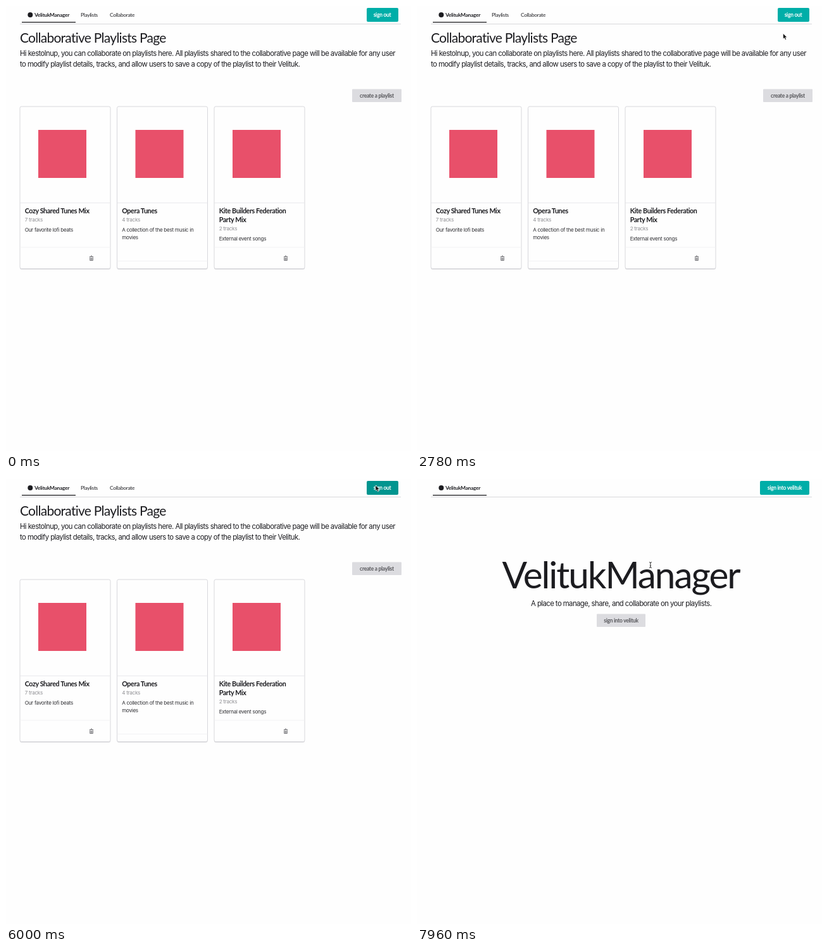
Write an HTML page that moves like this. It is 640 by 704 pixels and loops after 8000 ms.

```html
<!DOCTYPE html>
<html lang="en">
<head>
<meta charset="utf-8">
<title>Playlist manager</title>
<style>
  html, body { margin: 0; width: 100%; height: 100%; overflow: hidden; background: #fefefe; }
  svg { display: block; width: 100vw; height: 100vh; }
  text { fill: #1c1c20; white-space: pre; }
  .lato { font-family: Lato, sans-serif; letter-spacing: -.035em; }
  .bold { font-weight: 700; }
  .body { font: 11.3px Inter, sans-serif; letter-spacing: -.048em; }
  .small { font: 8.1px Inter, sans-serif; letter-spacing: -.034em; }
  .meta { fill: #8e8e92; }
  .label { font-size: 8.5px; font-weight: 700; }
  .label, .title { text-anchor: middle; }
  .white { fill: #fff; }
  .gray { fill: #58585c; }
  .desc { fill: #2e2e32; }
</style>
</head>
<body>
<svg id="stage" viewBox="0 0 640 704" preserveAspectRatio="none">
  <g id="nav"></g>
  <g id="playlists"></g>
  <g id="landing"></g>
  <g id="cursor">
    <path id="arrow" d="M0 0V8.6L2 6.9 3.4 10 5 9.3 3.6 6.2H6.3Z" fill="#111" stroke="#fff" stroke-width=".6"/>
    <path id="hand" d="M-1 0Q0-1.2 1 0V3L5 4Q6 4.4 5.6 6L4.8 9.6H.2L-2.6 5.8Q-2.8 4.2-1 5Z" fill="#fff" stroke="#222" stroke-width=".9"/>
    <path id="beam" d="M-2-4.5Q0-4.5 0-3Q0-4.5 2-4.5M0-3.5V3.5M-2 4.5Q0 4.5 0 3Q0 4.5 2 4.5M-1 1H1" fill="none" stroke="#222" stroke-width=".9"/>
  </g>
</svg>
<script>
const LOOP = 8000;
const PAGE_SWAP = 6480;
const FONTS_READY = 7000;
const TEAL = '#00aea8', TEAL_HOVER = '#00958f', TEAL_WAIT = '#00a49e';
const GRAY = '#dcdce0', INK = '#1c1c20', PAPER = '#fefefe';

const $ = id => document.getElementById(id);

function add(parent, tag, attrs, content) {
  const el = document.createElementNS('http://www.w3.org/2000/svg', tag);
  for (const key in attrs) el.setAttribute(key, attrs[key]);
  if (content) el.textContent = content;
  return parent.appendChild(el);
}
const group = parent => add(parent, 'g', {});
const text = (parent, x, y, str, cls, size) =>
  add(parent, 'text', { x, y, class: cls, ...(size && { style: `font-size:${size}px` }) }, str);
const box = (parent, x, y, width, height, fill, rx = 0) =>
  add(parent, 'rect', { x, y, width, height, fill, rx });

// navigation
const nav = $('nav');
box(nav, 22, 28, 602, 1, '#d8d8dc');
const underline = box(nav, 25, 25, 85, 1.3, INK);
const brand = group(nav);
add(brand, 'circle', { cx: 38.3, cy: 14, r: 4, fill: INK });
text(brand, 45, 17, 'VelitukManager', 'lato bold', 8.4);

// playlists page
const page = $('playlists');
text(page, 118, 17, 'Playlists', 'lato', 8.4);
text(page, 164, 17, 'Collaborate', 'lato', 8.4);
const signOut = box(page, 570, 3, 50, 22, TEAL, 2);
text(page, 594.5, 16.7, 'sign out', 'lato label white');
text(page, 22, 58, 'Collaborative Playlists Page', 'lato', 21);
text(page, 22, 79, 'Hi kestolnup, you can collaborate on playlists here. All playlists shared to the collaborative page will be available for any user', 'body');
text(page, 22, 96, 'to modify playlist details, tracks, and allow users to save a copy of the playlist to their Velituk.', 'body');
box(page, 547, 131.5, 78, 20.5, GRAY, 1);
text(page, 586, 144.7, 'create a playlist', 'lato label gray');

function trash(parent, x, y) {
  add(parent, 'path', {
    d: `M${x - 3} ${y - 2.5}H${x + 3}M${x - 1} ${y - 3.7}H${x + 1}M${x - 2.3} ${y - 1.7}V${y + 3.6}H${x + 2.3}V${y - 1.7}M${x - .8} ${y - 1}V${y + 3}M${x + .8} ${y - 1}V${y + 3}`,
    fill: 'none', stroke: '#66666a', 'stroke-width': .9
  });
}

function card(x, titles, tracks, lines, removable) {
  const g = group(page), left = x + 7.7;
  const shift = (titles.length - 1) * 13.5;
  box(g, x, 161, 143, 255.7, '#d4d4d8', 2.5);
  add(g, 'rect', { x, y: 159, width: 143, height: 256.5, rx: 2.5, fill: PAPER, stroke: '#d8d8dc', 'stroke-width': 1 });
  box(g, x + 29, 196, 76, 76, '#e8506a');
  box(g, x, 311, 143, .8, '#e4e4e8');
  titles.forEach((s, i) => text(g, left, 328 + i * 13.5, s, 'lato bold', 10.7));
  text(g, left, 341 + shift, tracks, 'small meta');
  lines.forEach((s, i) => text(g, left, 357.3 + shift + i * 12, s, 'small desc'));
  box(g, x, removable ? 381.5 : 403, 143, .8, '#f0f0f2');
  if (removable) trash(g, x + 113, 399);
}
card(22, ['Cozy Shared Tunes Mix'], '7 tracks', ['Our favorite lofi beats'], true);
card(175.5, ['Opera Tunes'], '4 tracks', ['A collection of the best music in', 'movies'], false);
card(329, ['Kite Builders Federation', 'Party Mix'], '2 tracks', ['External event songs'], true);

// landing page
const landing = $('landing');
const signIn = box(landing, 542, 3, 78, 22, TEAL, 2);
const signInCenter = box(landing, 284, 213.5, 77, 20.5, GRAY, 1);
text(landing, 180, 201, 'A place to manage, share, and collaborate on your playlists.', 'body');
const late = group(landing);
text(late, 581, 16.7, 'sign into velituk', 'lato label white');
text(late, 322.5, 226.7, 'sign into velituk', 'lato label gray');
text(late, 322, 173, 'VelitukManager', 'lato title', 58.5);

// pointer path: time, x, y
const path = [
  [0, 502, 716], [400, 508, 520], [820, 514, 342], [1140, 511.5, 268], [1560, 526, 200], [2400, 572, 66],
  [2780, 578.5, 43.5], [3240, 594, 13], [4060, 599, 8], [5760, 599, 8], [6000, 584, 10],
  [6480, 560, 14], [6820, 536.5, 18], [7540, 480, 38], [7960, 369, 136], [8000, 366, 138]
];

function pointerAt(t) {
  const i = path.findIndex(p => p[0] > t);
  const [t0, x0, y0] = path[i - 1], [t1, x1, y1] = path[i];
  const k = (t - t0) / (t1 - t0);
  return [x0 + (x1 - x0) * k, y0 + (y1 - y0) * k];
}

const show = (el, on) => { el.style.display = on ? '' : 'none'; };
const resize = (el, x, width) => { el.setAttribute('x', x); el.setAttribute('width', width); };

function render(t) {
  const [x, y] = pointerAt(t);
  const swapped = t >= PAGE_SWAP, ready = !swapped || t >= FONTS_READY;
  const hover = !swapped && x > 570 && y < 25;

  show(page, !swapped);
  show(landing, swapped);
  show(brand, ready);
  show(late, ready);
  underline.setAttribute('width', ready ? 85 : 87);
  resize(signIn, ready ? 542 : 538, ready ? 78 : 82);
  resize(signInCenter, ready ? 284 : 281, ready ? 77 : 82);
  signOut.setAttribute('fill', hover ? TEAL_HOVER : TEAL);
  signIn.setAttribute('fill', ready ? TEAL : TEAL_WAIT);

  const beam = swapped && y > 126, hand = hover && t < 5860;
  show($('beam'), beam);
  show($('hand'), hand);
  show($('arrow'), !beam && !hand);
  $('cursor').setAttribute('transform', `translate(${x} ${y})`);
}

const start = performance.now();
function tick() {
  render((performance.now() - start) % LOOP);
  requestAnimationFrame(tick);
}
tick();
</script>
</body>
</html>
```
